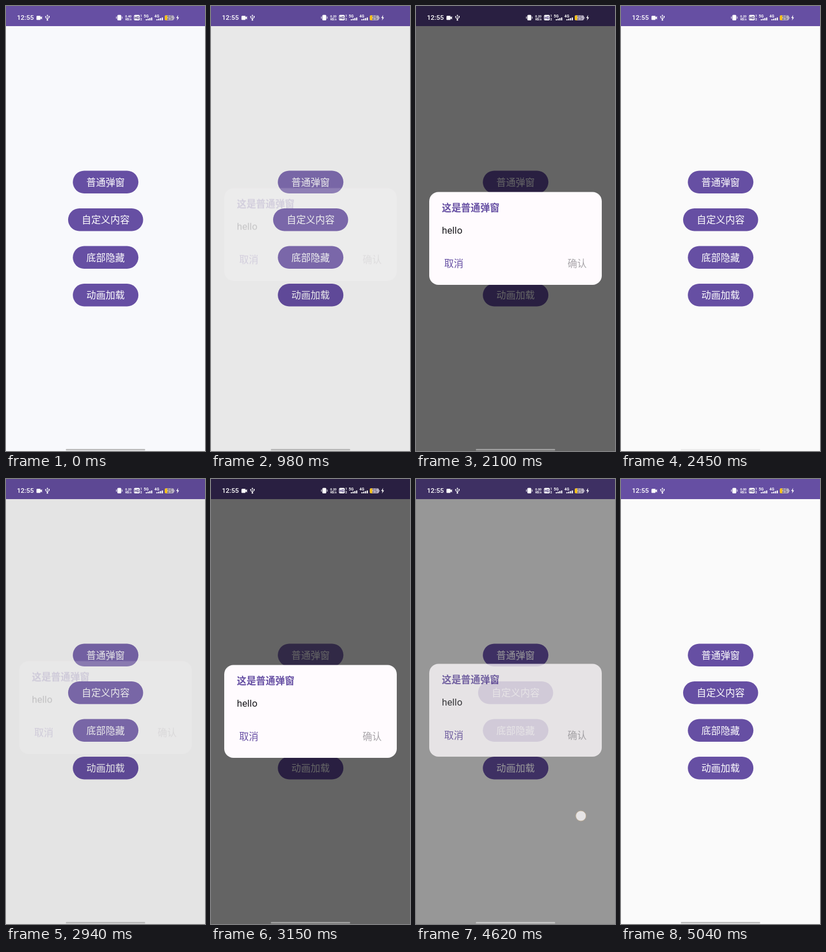
An HTML page for the animation above (5.11 s loop, 346 by 774 pixels).

```html
<!DOCTYPE html>
<html lang="zh-CN">
<head>
<meta charset="utf-8">
<title>Dialog demo</title>
<style>
  html, body { margin: 0; width: 100%; height: 100%; overflow: hidden; background: #fafafa; }
  svg { display: block; width: 346px; height: 774px; }
  text { font-family: "Noto Sans CJK SC", "Noto Sans CJK", sans-serif; font-size: 16.7px; }
  .latin { font-family: Roboto, sans-serif; }
  .tiny { font: 700 5.4px Roboto, sans-serif; }
  .net { font: 700 6.6px Roboto, sans-serif; }
  .mid { text-anchor: middle; }
</style>
</head>
<body>
<svg viewBox="0 0 346 774">
  <rect id="page" width="346" height="774" fill="#fafafa"/>
  <rect width="346" height="35" fill="#664fa3"/>
  <g id="buttons"></g>
  <rect id="scrim" width="346" height="774" opacity="0"/>

  <g id="status" fill="#fff">
    <text class="latin" x="19" y="24.4" style="font-size:11.6px;font-weight:500">12:55</text>
    <path d="M54 17h5q1 0 1 1v1.8l2.6-2v5.6l-2.6-2v1.8q0 1-1 1h-5q-1 0-1-1v-5q0-1 1-1z"/>
    <g fill="none" stroke="#fff" stroke-width="1">
      <path d="M72 16v8M69 18.5v2.2l3 1.8M75 18.5v2l-3 1.8"/>
      <path d="M192 18.4v3.6M202 18.4v3.6"/>
    </g>
    <path d="M70.6 17L72 14.8l1.4 2.2z"/>
    <circle cx="72" cy="24.3" r="1.3"/>
    <circle cx="69" cy="18.5" r="1"/>
    <path d="M74 17.6h2v2h-2z"/>
    <rect x="193.6" y="15.6" width="6.8" height="9.4" rx="1.5"/>
    <g id="speeds"></g>
    <text class="tiny mid" x="212.8" y="25.2" style="font-size:5px">KB/s</text>
    <rect x="222.6" y="15.6" width="10" height="9.4" rx="1.8"/>
    <text id="hd" class="mid latin" x="227.6" y="22.8" fill="#4b3a7c" style="font-size:6.4px;font-weight:700">HD</text>
    <text class="tiny" x="233.4" y="19.4">1</text>
    <text class="tiny" x="233.4" y="25.2">2</text>
    <g id="signals"></g>
    <rect x="276" y="16.2" width="16" height="8.8" rx="2.4" fill="#bcb4c8"/>
    <path d="M280.4 16.2h-2q-2.4 0-2.4 2.4v4q0 2.4 2.4 2.4h2z" fill="#fbc116"/>
    <rect x="292.4" y="19" width="1" height="3.2" rx=".5" fill="#bcb4c8"/>
    <text class="mid latin" x="284.4" y="23.7" fill="#68607a" style="font-size:8.4px;font-weight:500">25</text>
    <path d="M299.3 15.6l-3.3 5.5h2.1l-.8 4.2 3.6-5.6h-2.2z"/>
  </g>

  <g id="dialog" opacity="0">
    <rect x="23" y="323.5" width="300" height="161.5" rx="16" fill="#fffbfe"/>
    <text x="45" y="357.3" fill="#664fa3" font-weight="700">这是普通弹窗</text>
    <text class="latin" x="45" y="396" fill="#1c1b1f">hello</text>
    <text x="49" y="454.3" fill="#664fa3">取消</text>
    <text x="263.4" y="454.3" fill="#a9a6aa">确认</text>
  </g>

  <rect id="handle" x="104" y="770.5" width="138" height="2.6" rx="1.3" fill="#b9b9b9"/>
  <circle id="touch" cx="286.7" cy="586" r="9" fill="#e6e4e5" stroke="#b9a88f" stroke-width="1" opacity="0"/>
</svg>
<script>
const LOOP = 5110;
const $ = id => document.getElementById(id);

function add(parent, tag, attrs, label) {
  const el = document.createElementNS("http://www.w3.org/2000/svg", tag);
  for (const key in attrs) el.setAttribute(key, attrs[key]);
  if (label) el.textContent = label;
  return $(parent).appendChild(el);
}

// steps: [ms, value] pairs, interpolated linearly; the first and last values are held.
function track(el, prop, steps) {
  const all = [[0, steps[0][1]], ...steps, [LOOP, steps[steps.length - 1][1]]];
  const frames = all.map(([ms, value]) => ({ offset: ms / LOOP, [prop]: value }));
  const anim = el.animate(frames, { duration: LOOP, iterations: Infinity });
  anim.startTime = document.timeline.currentTime;
}

// Visible only between two times, with hard edges.
function showBetween(el, from, to) {
  track(el, "opacity", [[from, from ? 0 : 1], [from, 1], [to, 1], [to, to < LOOP ? 0 : 1]]);
}

const buttons = [
  ["普通弹窗", 114], ["自定义内容", 130.5], ["底部隐藏", 114], ["动画加载", 114]
];
buttons.forEach(([label, width], i) => {
  const y = 286.6 + i * 65.5;
  const box = { x: 173.2 - width / 2, y, width, height: 39.4, rx: 19.7 };
  add("buttons", "rect", { ...box, fill: "#664fa3" });
  if (i === 0) add("buttons", "rect", { ...box, id: "ripple", fill: "#fff", opacity: 0 });
  add("buttons", "text", { class: "mid", x: 173.2, y: y + 26.3, fill: "#fff" }, label);
});

[["5G", 240], ["4G", 258.5]].forEach(([label, x]) => {
  add("signals", "text", { class: "net", x: x - .4, y: 19.8 }, label);
  for (let i = 0; i < 4; i++) {
    const height = 2 + i;
    add("signals", "rect", { x: x + 3 + i * 3.1, y: 25 - height, width: 2, height });
  }
});

[["0.40", 0, 910], ["0.20", 910, 3920], ["0.00", 3920, LOOP]].forEach(([label, from, to]) => {
  showBetween(add("speeds", "text", { class: "tiny mid", x: 212.8, y: 20 }, label), from, to);
});

track($("page"), "fill", [[840, "#f8f9fc"], [980, "#fafafa"]]);
track($("scrim"), "opacity", [
  [950, 0], [1190, .55], [1330, .6], [2150, .6], [2360, 0],
  [2910, 0], [3120, .6], [4550, .6], [4620, .4], [4780, 0]
]);
track($("dialog"), "opacity", [
  [950, 0], [1130, 1], [2150, 1], [2340, 0],
  [2910, 0], [3090, 1], [4560, 1], [4620, .77], [4760, 0]
]);
track($("dialog"), "transform", [
  [950, -8], [1150, 0], [2150, 0], [2340, -8],
  [2910, -8], [3110, 0], [4560, 0], [4620, -2], [4760, -8]
].map(([ms, y]) => [ms, `translateY(${y}px)`]));
track($("ripple"), "opacity", [
  [860, 0], [930, .18], [1190, .18], [1400, 0],
  [2820, 0], [2890, .16], [3150, .14], [3360, 0]
]);
track($("handle"), "fill", [
  [950, "#b9b9b9"], [1150, "#a2a2a2"], [2150, "#a2a2a2"], [2360, "#ebebeb"],
  [2500, "#ebebeb"], [2520, "#b9b9b9"], [2910, "#b9b9b9"], [3120, "#a2a2a2"],
  [4560, "#a2a2a2"], [4620, "#c8c8c8"], [4780, "#ebebeb"], [4830, "#b9b9b9"]
]);
showBetween($("touch"), 4550, 4690);
</script>
</body>
</html>
```
